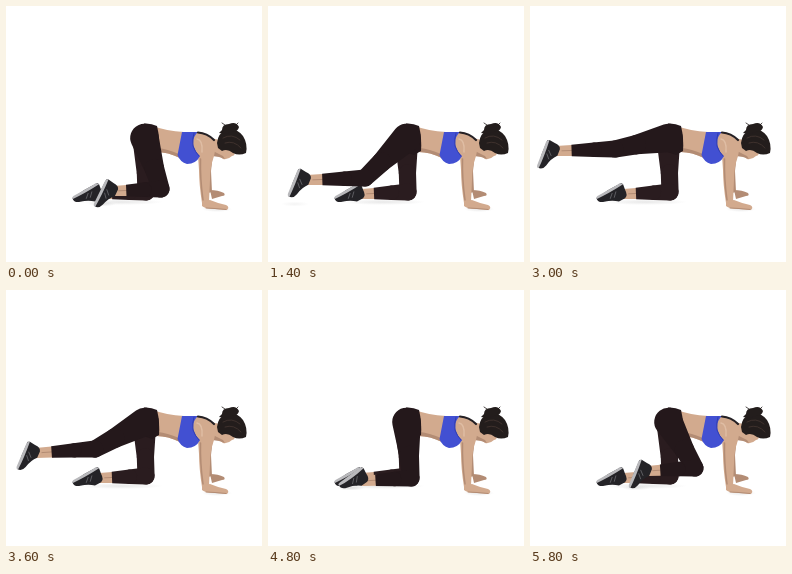
Write an HTML page with a canvas that moves like this. It is 256 by 256 pixels and loops after 6000 ms.

```html
<!DOCTYPE html>
<html lang="en">
<head>
<meta charset="utf-8">
<title>Kneeling kickback</title>
<style>
  html, body { margin: 0; width: 100%; height: 100%; overflow: hidden; background: #fff; }
  canvas { display: block; width: 256px; height: 256px; }
</style>
</head>
<body>
<canvas id="stage"></canvas>
<script>
const canvas = document.getElementById('stage');
const ctx = canvas.getContext('2d');
const scale = window.devicePixelRatio || 1;
canvas.width = canvas.height = Math.round(256 * scale);

const STEP = 200, STEPS = 30;
const HIP = [138.5, 132];
const SKIN = '#d2aa8e', SKIN_DARK = '#b38c74', SKIN_LIGHT = '#dfbda4';
const PANTS = '#24181b', PANTS_FAR = '#2a1c1f', HAIR = '#231d1c', BLUE = '#4250d2';

// step, knee x, knee y, ankle x, ankle y, shoe angle, sole depth
const poses = [
  [0, 155, 183, 108, 185, 116, 3],
  [3, 143, 188, 95, 191, 142, 4],
  [7, 97, 172, 39, 174, 112, 3],
  [9, 88, 157, 31, 161, 112, 3],
  [11, 85, 147, 28, 151, 113, 3],
  [13, 84, 142, 26, 144, 111, 3],
  [15, 85, 143, 26, 145, 111, 3],
  [18, 89, 159, 30, 163, 113, 3],
  [20, 98, 174, 44, 180, 116, 3],
  [24, 143, 188, 95, 191, 144, 4],
  [27, 155, 183, 108, 185, 116, 3],
  [28, 165, 178, 118, 181, 112, 3],
  [29, 165, 178, 118, 181, 112, 3]
].map(([step, kx, ky, ax, ay, foot, sole]) => ({
  step,
  v: [
    Math.atan2(HIP[0] - kx, ky - HIP[1]), Math.hypot(kx - HIP[0], ky - HIP[1]),
    Math.atan2(ay - ky, kx - ax), Math.hypot(ax - kx, ay - ky),
    foot * Math.PI / 180, sole
  ]
}));

function keyAt(i) {
  const n = poses.length, turn = Math.floor(i / n), p = poses[i - turn * n];
  return { step: p.step + turn * STEPS, v: p.v };
}

// Smooth curve through the poses, joint angles and lengths together
function poseAt(step) {
  let i = poses.length - 1;
  while (poses[i].step > step) i--;
  const [a, b, c, d] = [-1, 0, 1, 2].map(k => keyAt(i + k));
  const span = c.step - b.step, u = (step - b.step) / span;
  return b.v.map((y0, k) => {
    const y1 = c.v[k];
    const m0 = (y1 - a.v[k]) / (c.step - a.step) * span;
    const m1 = (d.v[k] - y0) / (d.step - b.step) * span;
    const u2 = u * u, u3 = u2 * u;
    return (2 * u3 - 3 * u2 + 1) * y0 + (u3 - 2 * u2 + u) * m0 +
           (3 * u2 - 2 * u3) * y1 + (u3 - u2) * m1;
  });
}

const mix = (p, q, t) => [p[0] + (q[0] - p[0]) * t, p[1] + (q[1] - p[1]) * t];

function shape(d, fill) {
  ctx.fillStyle = fill;
  ctx.fill(new Path2D(d));
}

function line(d, color, width) {
  ctx.strokeStyle = color;
  ctx.lineWidth = width;
  ctx.lineCap = ctx.lineJoin = 'round';
  ctx.stroke(new Path2D(d));
}

// Limb tapering from radius r at p to radius s at q, with a round or flat end
function limb(p, r, q, s, fill, flat) {
  const dir = Math.atan2(q[1] - p[1], q[0] - p[0]);
  const lean = Math.acos((r - s) / Math.hypot(q[0] - p[0], q[1] - p[1]));
  ctx.beginPath();
  ctx.arc(p[0], p[1], r, dir + lean, dir - lean);
  if (flat) {
    for (const a of [dir - lean, dir + lean]) ctx.lineTo(q[0] + s * Math.cos(a), q[1] + s * Math.sin(a));
  } else {
    ctx.arc(q[0], q[1], s, dir - lean, dir + lean);
  }
  ctx.closePath();
  ctx.fillStyle = fill;
  ctx.fill();
}

function shadow(x, y, w, h, alpha) {
  ctx.save();
  ctx.translate(x, y);
  ctx.scale(w, h);
  const g = ctx.createRadialGradient(0, 0, 0, 0, 0, 1);
  g.addColorStop(0, `rgba(90,90,90,${alpha})`);
  g.addColorStop(1, 'rgba(90,90,90,0)');
  ctx.fillStyle = g;
  ctx.fillRect(-1, -1, 2, 2);
  ctx.restore();
}

function shoe(ankle, angle, sole) {
  ctx.save();
  ctx.translate(...ankle);
  ctx.rotate(angle);
  ctx.translate(-7, 12);
  shape('M-1 -2 L0 -8 Q0 -14 4 -15 L11 -15 Q16 -10 24 -8 Q30 -6 29 -1 Q15 1 0 0Z', '#242327');
  shape(`M-1 -2 Q0 1 4 .5 L27 .5 Q30 0 29 -2 Q16 ${-sole} -1 -2Z`, '#b9b9bc');
  line('M9 -5 L13 -9 M13 -4.5 L17 -8', '#66666a', .8);
  ctx.restore();
}

function leg(hip, hipR, knee, ankle, foot, angle, sole, fill) {
  const kneeR = 8.6, calfR = 7.2;
  const cuff = mix(knee, ankle, .73), calf = mix(knee, ankle, .35);
  const thigh = mix(hip, knee, .6), thighR = hipR * .4 + kneeR * .6 - 1.1;
  limb(cuff, 5.5, ankle, 5, SKIN);
  line(`M${cuff} L${mix(knee, ankle, .9)}`, SKIN_DARK, 1);
  shoe(foot, angle, sole);
  limb(hip, hipR, thigh, thighR, fill);
  limb(thigh, thighR, knee, kneeR, fill);
  limb(knee, kneeR, calf, calfR, fill);
  limb(calf, calfR, cuff, 5.8, fill, true);
}

function upperBody() {
  // far arm and hand
  shape('M200 148 L207 147 L205 165 L206 186 L202 187Z', SKIN_DARK);
  shape('M204 184 Q212 184 218 187 Q220 190 216 190 L206 193Z', SKIN_DARK);
  // waist
  shape('M147 120 Q160 125 178 126 L174 152 Q162 146 151 146Z', SKIN);
  shape('M151 146 Q162 146 174 152 L173 148 Q161 143 152 142Z', SKIN_DARK);
  // neck, face
  shape('M199 131 L214 134 L228 146 Q230 149 226 150 Q222 154 217 153 L211 148 L204 149Z', SKIN);
  shape('M207 145 L217 150 L219 153 L213 151 L206 150Z', SKIN_DARK);
  // shoulder and near arm
  shape('M182 126 L192 126 Q201 127 206 133 Q211 140 208 150 Q204 161 204 174 L203 196 L196 197 ' +
        'Q193 178 193 164 L192 150 L182 146Z', SKIN);
  line('M194.5 153 Q194 173 197 194', SKIN_DARK, 1.5);
  line('M191 133 Q197 134 196 146', SKIN_LIGHT, 1.5);
  shape('M196 195 L204 194 Q211 197 220 199 Q224 201 221 204 L209 203 Q199 203 196 200Z', SKIN);
  line('M200 202 L209 202.5 L220 203.5', SKIN_DARK, 1);
  // top and strap
  shape('M176 126 L192 126 Q187 130 187 138 Q189 146 194 150 Q190 158 181 158 ' +
        'Q174 156 171.5 149Z', BLUE);
  line('M188 127 Q186 133 187 140 Q189 146 193 150', '#303db0', 1);
  line('M192 126.5 Q201 127 208 134', '#242024', 2.2);
  // hair and bun
  shape('M211 137 Q212 127 220 124 Q231 122 237 130 Q242 138 240 147 Q233 150 227 147 ' +
        'Q221 142 216 145 L212 142Z', HAIR);
  shape('M216 124 Q216 118 223 118 Q230 115 233 121 Q232 126 226 126 L219 128 L213 127Z', HAIR);
  line('M219 119 L216 117 M230 119 L232 117', HAIR, .8);
  line('M217 132 Q226 127 234 134 M219 137 Q228 134 235 142', '#463631', .8);
}

function draw(step) {
  const [thigh, thighLen, shin, shinLen, foot, sole] = poseAt(step);
  const knee = [HIP[0] - Math.sin(thigh) * thighLen, HIP[1] + Math.cos(thigh) * thighLen];
  const ankle = [knee[0] - Math.cos(shin) * shinLen, knee[1] + Math.sin(shin) * shinLen];

  ctx.setTransform(scale, 0, 0, scale, 0, 0);
  ctx.fillStyle = '#fff';
  ctx.fillRect(0, 0, 256, 256);

  shadow(115, 196, 42, 3, .14);
  shadow(211, 203, 15, 3, .15);
  shadow(ankle[0] - 12, 198, 14, 2.5, Math.max(0, (ankle[1] - 165) / 130));

  leg([138.5, 138], 11.4, [140, 186], [94, 188], [91, 191], 2.63, 3, PANTS_FAR);
  upperBody();
  shape('M138 117.5 Q145 117 151 120 Q154 132 153 145 L146 149 L132 144Z', PANTS);
  leg(HIP, 14.3, knee, ankle, ankle, foot, sole, PANTS);
}

let shown = -1;
const start = performance.now();
function tick(now) {
  const step = Math.floor(Math.max(0, now - start) / STEP) % STEPS;
  if (step !== shown) draw(shown = step);
  requestAnimationFrame(tick);
}
tick(start);
</script>
</body>
</html>
```
